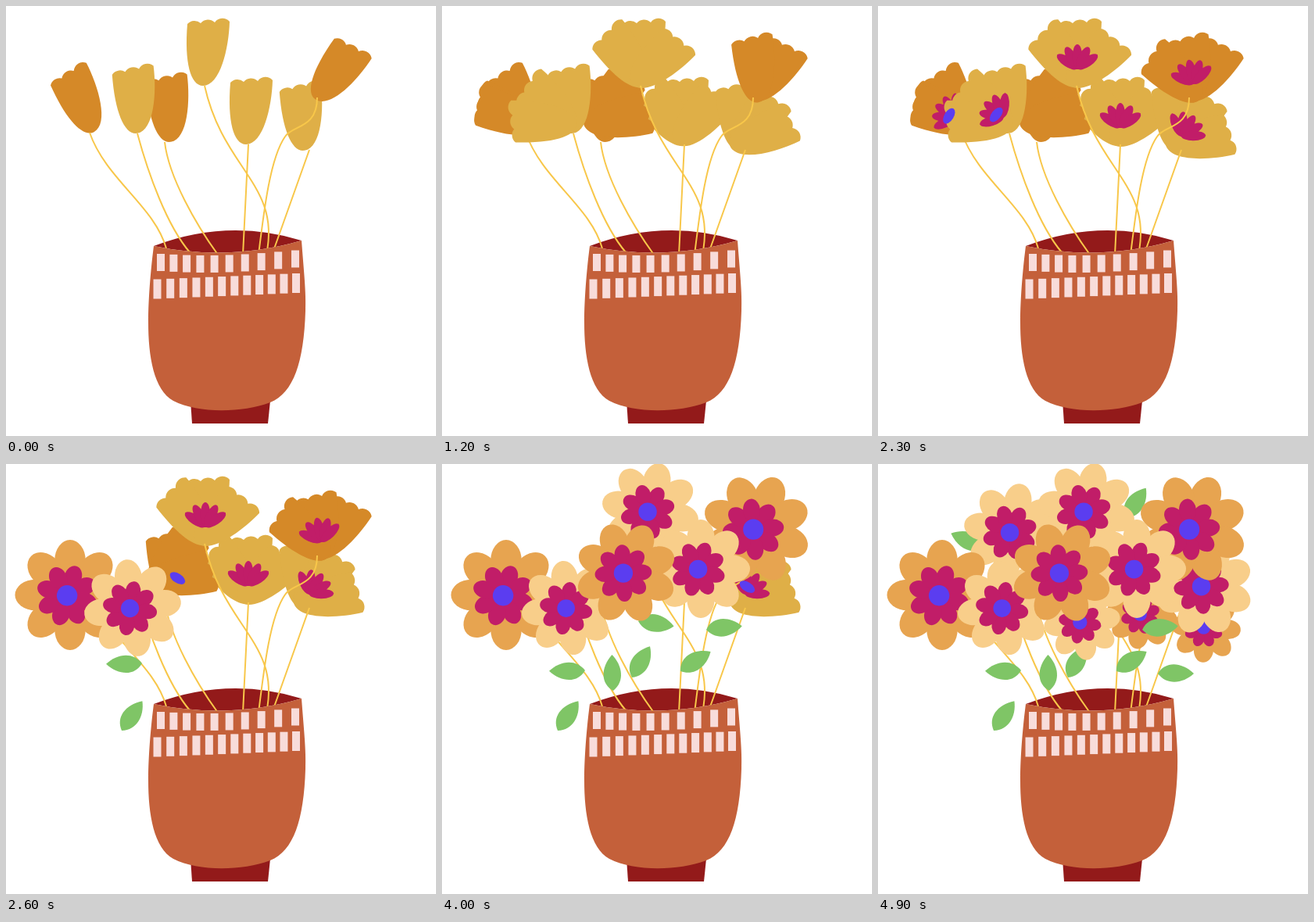
Recreate the animation shown at these times as an HTML page with a canvas. Size 550 px wide and 550 px high, loop 5000 ms.

```html
<!DOCTYPE html>
<html lang="en">
<head>
<meta charset="utf-8">
<title>Vase of flowers</title>
<style>
html, body { margin: 0; width: 100%; height: 100%; overflow: hidden; background: #fff; }
canvas { display: block; width: 550px; height: 550px; }
</style>
</head>
<body>
<canvas id="stage" width="550" height="550"></canvas>
<script>
const ctx = document.getElementById('stage').getContext('2d');
const STEP = 100, STEPS = 50, SPREAD = 42, EYE_LEAD = 2, LEAF = 46;
const ORANGE = '#d58928', YELLOW = '#dfaf47', AMBER = '#e7a450', PEACH = '#f8ce8a';
const PINK = '#c11d68', BLUE = '#5b3df0', GREEN = '#7fc566';
const CLAY = '#c4603a', WINE = '#931a1a', TILE = '#f8dcda', STEM = '#f8c74a';

const budPath = new Path2D('M-20-67A12 12 0 0 1-3-68A12 12 0 0 1 15-69A12 12 0 0 1 34-70C33-36 22 12 0 12C-16 12-24-18-20-67Z');
const bowlPath = new Path2D('M-26-4C-22 9-11 15 0 15C11 15 22 9 26-4L0 2Z');
const leafPath = new Path2D('M0 0C.2-.34.64-.34 1 0C.7.28.25.34 0 0Z');
const stemPath = new Path2D(
  'M107 162C128 222 190 256 205 310M168 163C182 215 206 281 235 315' +
  'M203 174C208 219 244 281 271 318M254 102C278 210 352 228 333 318' +
  'M310 177L303 318M388 184L341 316M398 117C398 157 367 152 357 167C338 194 330 261 323 318');
const bodyPath = new Path2D('M189 307Q285 327 378 300C381 340 384 366 383 390C381 455 368 495 338 507C300 521 246 521 214 505C189 491 182 448 182 405C182 370 186 330 189 307Z');
const rimPath = new Path2D('M189 307Q284 271 378 300Q285 327 189 307Z');
const footPath = new Path2D('M236 505H338L335 534H238Z');

// Left to right. bud: x, y, tilt; fan: side of each added petal; hub: shift of those petals;
// bloom: x, y, radius, turn; leaf: x, y, angle
const flowers = [
  { amber: true, bud: [107, 150.5, -29], fan: [-1, -1.1], hub: [6, 0], bloom: [82, 167.5, 70.5, 0], opens: 24, leaf: [148, 341, -55] },
  { bud: [166, 151, -9], fan: [-1, -2], hub: [-6, 0], bloom: [162, 184, 60.5, -8], opens: 25, leaf: [183, 264, 179] },
  { amber: true, bare: true, bud: [209, 162, -9], fan: [1, 2], hub: [-16, -14], bloom: [235.5, 139, 65, -21], opens: 28, leaf: [219, 290, -92] },
  { bud: [252, 90, 0], fan: [-1, 1], bloom: [266.5, 60.5, 62.5, 12], opens: 30, leaf: [243, 273, -60] },
  { bud: [307, 165, 0], fan: [-1, 1], bloom: [331, 134, 63, 0], opens: 36, leaf: [251, 201, 8] },
  { bud: [380, 173, -9], fan: [1, 2], bloom: [417, 156, 63, 22], opens: 41, leaf: [358, 268, 0] },
  { amber: true, bud: [402.5, 109.5, 31], fan: [-1, -2], bloom: [402, 83, 70, 22], opens: 37, leaf: [305, 265, -33] }
];
const behind = [
  { amber: true, bloom: [338, 192, 45, 10], opens: 46, leaf: [136, 106, 202] },
  { amber: true, bloom: [419, 209, 45, 5], opens: 47, leaf: [317, 69, -56] },
  { bloom: [261, 202, 49, -8], opens: 45 },
  { bloom: [172, 87, 62.5, 10], opens: 41 }
];
const frontLeaf = { opens: 37, leaf: [338, 212, -6] };

// painting order, back to front
const budOrder = [0, 4, 5, 2, 3, 6], bloomOrder = [5, 0, 6, 3, 4, 1, 2];

const mean = list => list.reduce((a, b) => a + b) / list.length;
const mix = (a, b, k) => a + (b - a) * k;
const stagger = (first, gap, i) => Math.ceil(first + gap * i);
const appear = (step, start, first) => step < start ? 0 : step > start ? 1 : first;

function at(x, y, angle, draw, sx = 1, sy = sx) {
  ctx.save();
  ctx.translate(x, y);
  ctx.rotate(angle * Math.PI / 180);
  ctx.scale(sx, sy);
  draw();
  ctx.restore();
}

function fill(path, color) {
  ctx.fillStyle = color;
  ctx.fill(path);
}

function oval(x, y, rx, ry = rx) {
  ctx.beginPath();
  ctx.ellipse(x, y, rx, ry, 0, 0, 2 * Math.PI);
  ctx.fill();
}

const fanAxis = f => f.bud[2] + SPREAD * mean([0, ...f.fan]);

function drawHeart() {
  fill(bowlPath, PINK);
  for (let i = -2; i <= 2; i++) at(0, 14, i * 28, () => oval(0, -15.5, 6.3, 15.5));
}

function drawBud(i, step) {
  const f = flowers[i];
  if (step >= f.opens) return;
  const [x, y, tilt] = f.bud, [hx, hy] = f.hub || [0, 2];
  const color = f.amber ? ORANGE : YELLOW;
  const starts = [stagger(1, .83, i), stagger(8.5, .7, i)];
  at(x, y, tilt, () => fill(budPath, color));
  f.fan.forEach((side, j) => {
    const k = appear(step, starts[j], .85);
    if (k) at(x + hx * k, y + hy * k, tilt + side * SPREAD * k, () => fill(budPath, color));
  });
  const size = f.bare ? 0 : appear(step, stagger(13, .83, i), .6);
  if (size) at(x, y, fanAxis(f), () => at(3, -24, 0, drawHeart, size));
}

function rosette(x, y, r, turn, color) {
  ctx.fillStyle = color;
  oval(x, y, r * .66);
  for (let i = 0; i < 8; i++) at(x, y, turn + i * 45, () => oval(0, -r * .63, r * .28, r * .37));
}

function drawBloom(f, step) {
  const n = step - f.opens;
  const [x, y, r, turn] = f.bloom;
  if (n < 0) {
    if (f.bud && n >= -EYE_LEAD) {
      ctx.fillStyle = BLUE;
      at(f.bud[0], f.bud[1], fanAxis(f), () => oval(0, -19, 11, 6));
    }
    return;
  }
  const scale = [.6, 1.03, 1][Math.min(n, 2)];
  const [fx, fy] = n || !f.bud ? f.bloom : f.bud;
  at(mix(x, fx, .5), mix(y, fy, .5), 0, () => {
    const cx = -r * .055, cy = r * .01;
    rosette(0, 0, r, turn, f.amber ? AMBER : PEACH);
    rosette(cx, cy, r * .56, turn + 18, PINK);
    ctx.fillStyle = BLUE;
    oval(cx, cy, r * .187);
  }, scale);
}

function drawLeaf({ leaf, opens }, step) {
  if (!leaf || step < opens) return;
  const [x, y, angle] = leaf, slide = step - opens < 2 ? 9 : 0;
  at(x - slide, y - slide, angle, () => fill(leafPath, GREEN), LEAF);
}

function tileRow(count, x0, x1, y0, y1, bow, rise, height) {
  for (let i = 0; i < count; i++) {
    const k = i / (count - 1), arc = Math.sin(Math.PI * k);
    ctx.fillRect(mix(x0, x1, k) + bow * arc, mix(y0, y1, k) + rise * arc, 10, height);
  }
}

function drawVase() {
  fill(footPath, WINE);
  fill(bodyPath, CLAY);
  ctx.fillStyle = TILE;
  tileRow(10, 193, 365, 317, 312.5, -8, 4, 22);
  tileRow(12, 188.5, 366, 349.5, 342, 2, 0, 25);
}

function draw(step) {
  ctx.fillStyle = '#fff';
  ctx.fillRect(0, 0, 550, 550);
  fill(rimPath, WINE);
  budOrder.forEach(i => drawBud(i, step));
  ctx.strokeStyle = STEM;
  ctx.lineWidth = 2;
  ctx.stroke(stemPath);
  drawBud(1, step);
  drawVase();
  [...flowers, ...behind].forEach(f => drawLeaf(f, step));
  behind.forEach(f => drawBloom(f, step));
  drawLeaf(frontLeaf, step);
  bloomOrder.forEach(i => drawBloom(flowers[i], step));
}

let shown = -1;
const origin = performance.now();
function tick() {
  const step = Math.floor((performance.now() - origin) / STEP) % STEPS;
  if (step !== shown) draw(shown = step);
  requestAnimationFrame(tick);
}
tick();
</script>
</body>
</html>
```
